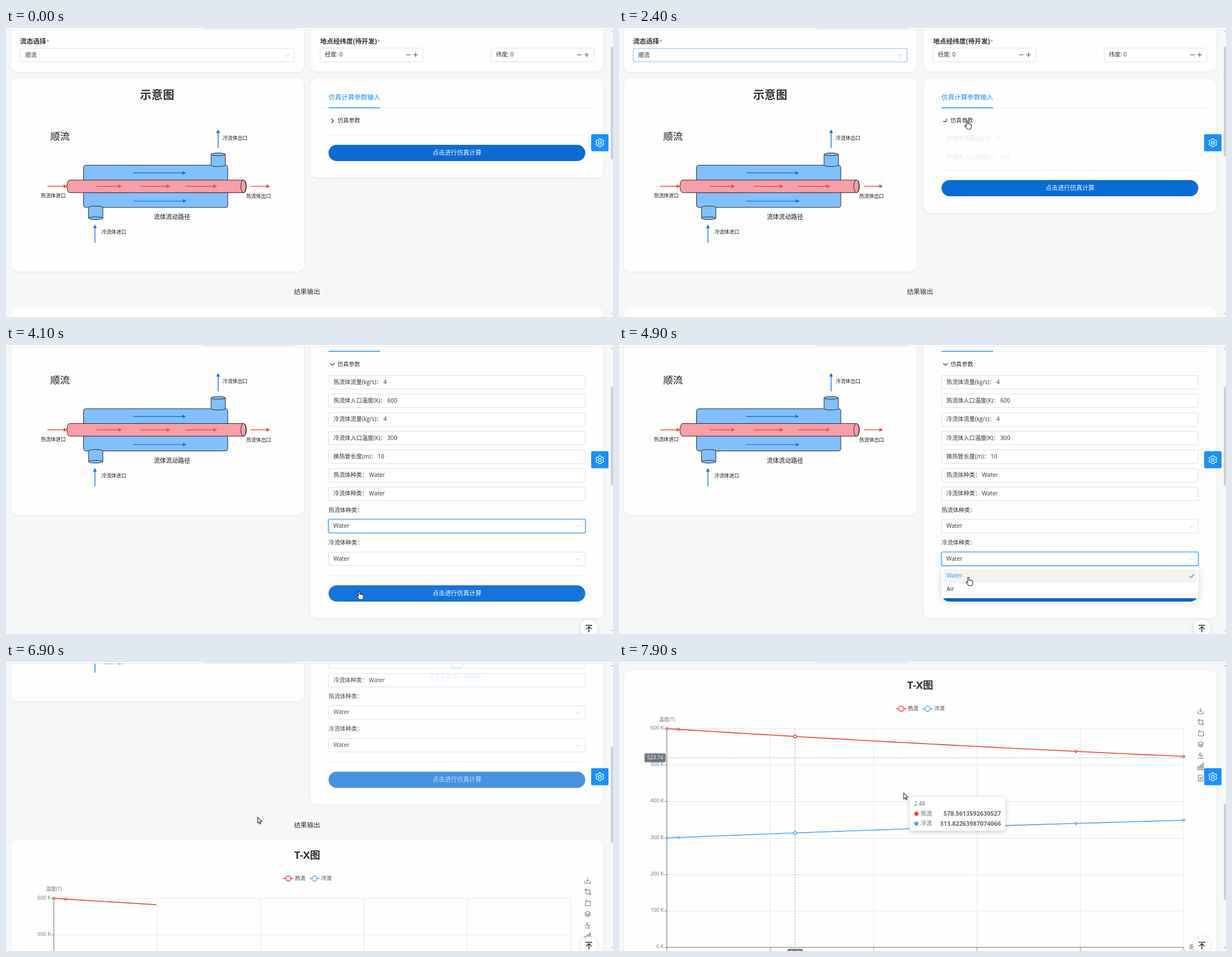
Recreate the animation shown at these times as an HTML page with a canvas. Size 1084 px wide and 517 px high, loop 8000 ms.

```html
<!DOCTYPE html>
<html lang="zh-CN">
<head>
<meta charset="utf-8">
<title>换热器仿真</title>
<style>
html, body { margin: 0; width: 100%; height: 100%; overflow: hidden; background: #f6f8f8; }
canvas { display: block; width: 1084px; height: 517px; }
</style>
</head>
<body>
<canvas id="stage"></canvas>
<script>
const W = 1084, H = 517, LOOP = 8000, STEP = 100;
const FONT = '"Open Sans", "Noto Sans CJK SC", "Noto Sans CJK", sans-serif';
const BLUE = '#1890ff', INK = '#303133', LINE = '#dcdfe6', GREY = '#6e7079';
const canvas = document.getElementById('stage');
const dpr = window.devicePixelRatio || 1;
canvas.width = W * dpr;
canvas.height = H * dpr;
const c = canvas.getContext('2d');

// Timing helpers
const clamp = v => Math.max(0, Math.min(1, v));
const ramp = (t, start, dur) => { const k = clamp((t - start) / dur); return k * k * (3 - 2 * k); };
const fade = (t, on, off, dur = 200) => ramp(t, on, dur) - ramp(t, off, dur);
const within = (t, a, b) => t >= a && t < b;

// Drawing helpers
function text(s, x, y, size, color = INK, align = 'left', weight = 400) {
  c.font = `${weight} ${size}px ${FONT}`;
  c.textAlign = align;
  c.textBaseline = 'middle';
  c.fillStyle = color;
  c.fillText(s, x, y + 0.5);
  return c.measureText(s).width;
}
function paint(fill, stroke, lw = 1, path) {
  if (fill) { c.fillStyle = fill; path ? c.fill(path) : c.fill(); }
  if (stroke) { c.strokeStyle = stroke; c.lineWidth = lw; path ? c.stroke(path) : c.stroke(); }
}
function rect(x, y, w, h, r, fill, stroke, lw) {
  c.beginPath();
  c.roundRect(x, y, w, h, r);
  paint(fill, stroke, lw);
}
function oval(x, y, rx, ry, fill, stroke, lw) {
  c.beginPath();
  c.ellipse(x, y, rx, ry, 0, 0, 7);
  paint(fill, stroke, lw);
}
const circle = (x, y, r, ...style) => oval(x, y, r, r, ...style);
function line(color, lw, x1, y1, x2, y2) {
  c.beginPath();
  c.moveTo(x1, y1);
  c.lineTo(x2, y2);
  paint(null, color, lw);
}
function place(x, y, turn, draw) {
  c.save();
  c.translate(x, y);
  c.rotate(turn);
  draw();
  c.restore();
}
const icon = (d, x, y, color, lw = 1, fill = null, turn = 0) =>
  place(x, y, turn, () => paint(fill, color, lw, new Path2D(d)));
function layer(alpha, draw) {
  if (alpha <= 0) return;
  c.save();
  c.globalAlpha *= alpha;
  draw();
  c.restore();
}
function shadowed(blur, dy, alpha, draw) {
  c.save();
  c.shadowBlur = blur * dpr;
  c.shadowOffsetY = dy * dpr;
  c.shadowColor = `rgba(0,15,30,${alpha})`;
  draw();
  c.restore();
}
const card = (x, y, w, h) => shadowed(4, 1, 0.07, () => rect(x, y, w, h, 12, '#fefefe'));

// Heat exchanger
function arrow(x, y, len, color, turn = 0) {
  place(x, y, turn, () => {
    line(color, 1.4, 0, 0, len - 2, 0);
    icon('M.5 0L-6-3.4V3.4Z', len, 0, null, 1, color);
  });
}
function nozzle(x, y, turn) {
  place(x, y, turn, () => {
    icon('M-12.8 0V19.5A12.8 2.3 0 0 0 12.8 19.5V0', 0, 0, '#222', 1, '#80c0ff');
    oval(0, 0, 12.8, 2.4, '#80c0ff', '#222');
  });
}
function diagram() {
  const red = '#f04a3e', blue = '#1570ee', ink = '#151515', up = -Math.PI / 2;
  text('示意图', 270, 121.5, 20.3, INK, 'center', 700);
  text('顺流', 79, 195, 17.4, ink);
  rect(138.5, 245.5, 257.5, 75.5, 4, '#80c0ff', '#222');
  icon('M0 0H311A4.8 11.3 0 0 1 311 22.6H0A4.6 11.3 0 0 1 0 0Z', 113.5, 272, '#222', 1, '#fa9ea8');
  oval(424, 283.3, 4.6, 11.3, '#fa9ea8', '#222');
  nozzle(379, 226, 0);
  nozzle(160.2, 340.3, Math.PI);
  for (const [x, len] of [[74, 35], [162, 44.5], [240, 53], [320, 56.5], [437, 34]]) arrow(x, 283.2, len, red);
  arrow(227, 259.3, 94, blue);
  arrow(227, 309.6, 95, blue);
  arrow(378.8, 214.5, 32.5, blue, up);
  arrow(158.8, 384.5, 32.5, blue, up);
  text('冷流体出口', 387, 197, 8.8, ink);
  text('热流体进口', 62.5, 300.5, 8.8, ink);
  text('热流体出口', 429, 301.5, 8.8, ink);
  text('冷流体进口', 170.5, 365.5, 8.8, ink);
  text('流体流动路径', 264, 339, 10.8, ink);
}

// Form controls
function select(x, y, w, label, focus, glow) {
  if (focus && glow) rect(x - 0.5, y - 0.5, w + 1, 25, 3, null, 'rgba(24,144,255,.25)', 3);
  rect(x, y, w, 24, 2, '#fff', LINE);
  layer(+focus, () => rect(x, y, w, 24, 2, null, glow ? '#3a9ff8' : '#7abdf7', 1.2));
  text(label, x + 8.7, y + 12, 10.2);
  icon('M-3.5-2L0 2 3.5-2', x + w - 12.5, y + 12.5, '#c0c4cc');
}
function options(x, y, w, items, alpha) {
  layer(alpha, () => {
    shadowed(15, 4, 0.17, () => rect(x, y, w, 56, 2, '#fff'));
    rect(x + 3, y + 4, w - 6, 24, 2, '#f3f3f4');
    items.forEach((s, i) => text(s, x + 9, y + 15.6 + 24 * i, 10.2, i ? '#1f2d3d' : '#2a8de8'));
    icon('M-4 0L-.5 3 4.5-3', x + w - 12, y + 16, BLUE, 1.3);
  });
}
function stepper(x, label, minus) {
  rect(x, 36, 183.5, 24.5, 2, '#fff', LINE);
  text(label, x + 8.5, 48, 10.2);
  icon('M-4 0H4M9 0H17M13-4V4', minus, 48, '#444');
}

const ROWS = [
  ['热流体流量(kg/s)：', 4], ['热流体入口温度(K)：', 600],
  ['冷流体流量(kg/s)：', 4], ['冷流体入口温度(K)：', 300],
  ['换热管长度(m)：', 10], ['热流体种类：', 'Water'], ['冷流体种类：', 'Water']
];

function form(t, grow, hover) {
  text('仿真计算参数输入', 576, 124.6, 11.55, BLUE);
  line('#f0f0f0', 1, 562, 143.5, 1050, 143.5);
  rect(576, 142, 92, 1.6, 0, '#2491f7');
  icon('M-2-4L2 0-2 4', 583, 166, '#333', 1.1, null, ramp(t, 2300, 200) * Math.PI / 2);
  text('仿真参数', 592, 166.2, 10.15);

  c.save();
  c.beginPath();
  c.rect(570, 180, 480, Math.max(0, grow - 2));
  c.clip();
  layer(ramp(t, 2360, 200), () => {
    ROWS.forEach(([label, value], i) => {
      const y = 198 + i * 33.3;
      rect(576, y - 12, 458.5, 24, 2, '#fff', LINE);
      const w = text(label, 584.7, y, 10.2);
      text(value, 587.2 + w, y, 10.2);
    });
    ['热', '冷'].forEach((kind, i) => {
      const y = 443.5 + i * 58.5, from = 3800 + i * 800;
      text(kind + '流体种类：', 576, y - 16.5, 10.2);
      select(576, y, 458.5, 'Water', within(t, from, i ? 6200 : 4600), true);
    });
  });
  c.restore();

  line('#ebeef2', 1, 576, 191.5 + grow, 1034, 191.5 + grow);
  layer(1 - 0.25 * fade(t, 6100, 6760, 400), () => {
    rect(576, 209 + grow, 458.5, 29, 14.5, hover ? '#1275dd' : '#086bd6');
    text('点击进行仿真计算', 805.5, 223.6 + grow, 10.9, '#fff', 'center');
  });
}
function loading(t, alpha) {
  layer(alpha * 0.7, () => {
    c.beginPath();
    c.arc(805, 363, 13, t / 160, t / 160 + 4.5);
    paint(null, BLUE, 2);
    text('正在计算中，请稍等...', 805.5, 392, 10.2, BLUE, 'center');
  });
}

// Chart
const X0 = 85.5, XW = 923, Y0 = 1179.2, YH = 391.2;
const px = x => X0 + x / 10 * XW, py = v => Y0 - v / 600 * YH;
const SERIES = [
  { name: '热流', color: '#fa3534', value: '578.5613592630527', f: x => 600 - 258.2 * (1 - Math.exp(-0.035 * x)) },
  { name: '冷流', color: '#48a6fa', value: '313.82263987074066', f: x => 300 + 153.7 * (1 - Math.exp(-0.038 * x)) }
];
const MARK = 2.48, SAMPLES = [0, 0.225, MARK, 7.914, 10];
const TOOLS = [
  'M-5 1V5H5V1M0-5V2M-3-1L0 2 3-1',
  'M-3-6V4H6M-6-3H4V6',
  'M-4-3H5V5H-4V0M-1-6L-4-3-1 0',
  'M-5-2L0-5 5-2 0 1ZM-5 0L0 3 5 0M-5 2L0 5 5 2',
  'M-5 1H-3L-1-5 1 3 2 0H5M-5 5H5',
  'M-5 4V0H-3V4M-1 4V-3H1V4M3 4V-6H5V4M-6 5.5H6',
  'M-4-5H2L4-3V6H-4ZM-2-1H2M-2 1H2M-2 3H2'
];

function badge(s, x, y, w, h) {
  rect(x - w / 2, y - h / 2, w, h, 2, '#6c7884');
  text(s, x, y - 0.3, 9, '#fff', 'center');
}
function pointer() {
  c.setLineDash([3, 2]);
  line('#b0b3b8', 1, px(MARK), py(600), px(MARK), Y0);
  line('#b0b3b8', 1, X0, 840.3, X0 + XW, 840.3);
  c.setLineDash([]);
  badge('523.74', 64.5, 840.2, 38, 15.8);
  badge(MARK, 314.5, 1189.5, 27, 15);
}
function axes() {
  for (let i = 0; i <= 6; i++) {
    const y = Math.round(py(i * 100)) + 0.3;
    line('#e2e7f1', 1, X0, y, X0 + XW, y);
    line(GREY, 1, X0 - 4, y, X0, y);
    text(i * 100 + ' K', 80, y - 1, 9.2, GREY, 'right');
  }
  for (let x = 0; x <= 10; x += 2) {
    line('#e2e7f1', 1, px(x), py(600), px(x), Y0);
    line(GREY, 1, px(x), Y0, px(x), Y0 + 4);
    text(x, px(x), Y0 + 10, 9.2, GREY, 'center');
  }
  line(GREY, 1, X0, py(600), X0, Y0);
  line(GREY, 1, X0, Y0, X0 + XW, Y0);
}
function chart(t, tip) {
  text('T-X图', 538, 712, 18.4, INK, 'center', 700);
  SERIES.forEach(({ name, color }, i) => {
    const x = 504 + i * 47;
    line(color, 1.6, x - 9, 752.5, x + 9, 752.5);
    circle(x, 752.5, 4.6, '#fff', color, 1.5);
    text(name, x + 12, 752, 9.3, '#333');
  });
  text('温度(T)', X0, 771.5, 9, GREY, 'center');
  text('距离(m)', 1018, Y0 - 0.7, 9, GREY);
  TOOLS.forEach((d, i) => icon(d, 1038.7, 756 + i * 20, '#6b6b6b'));
  if (t < 6800) return;

  axes();
  if (tip) pointer();
  const shown = 10 * clamp((t - 6800) / 505);
  for (const { color, f } of SERIES) {
    c.beginPath();
    for (let k = 0; k <= 60; k++) c.lineTo(px(shown * k / 60), py(f(shown * k / 60)));
    paint(null, color, 1.6);
    for (const x of SAMPLES)
      if (x <= shown) circle(px(x), py(f(x)), tip && x === MARK ? 2.5 : 1.8, '#fff', color, 1.4);
  }
}
function tooltip(x, y) {
  shadowed(8, 2, 0.22, () => rect(x, y, 171, 60, 3, '#fff'));
  text(MARK, x + 8, y + 12.5, 10.2, '#666');
  SERIES.forEach(({ name, color, value }, i) => {
    const ry = y + 30 + i * 17.5;
    circle(x + 12, ry - 0.3, 3.7, color);
    text(name, x + 19.5, ry, 10.3, '#666');
    text(value, x + 163, ry, 10.9, '#666', 'right', 700);
  });
}

// Page
const menus = t => ({ flow: fade(t, 800, 1300), hot: fade(t, 3750, 3900), cold: fade(t, 4600, 5000) });

function page(t, grow, hover, tip) {
  card(9, -30, 523, 108.5);
  card(544, -30, 522.5, 107.5);
  const heading = (s, x) => text('*', x + text(s, x, 24.2, 11.7, INK, 'left', 700), 24.2, 11, '#f56c5c');
  heading('流态选择', 25);
  heading('地点经纬度(待开发)', 561);
  select(25.5, 36.5, 489, '顺流', fade(t, 650, 2350), false);
  stepper(561, '经度: 0', 718.5);
  stepper(866.5, '纬度: 0', 1024);

  card(9, 90, 523, 345.5);
  diagram();
  card(544, 91, 522.5, 176.5 + grow);
  const busy = fade(t, 6100, 6760);
  layer(1 - busy / 2, () => form(t, grow, hover));
  loading(t, busy);

  const y = Math.max(435, 267 + grow) + 37.5;
  line('#eceff0', 1, 9, y, 504, y);
  line('#eceff0', 1, 571, y, 1066, y);
  text('结果输出', 537.5, y + 0.3, 11.7, INK, 'center');
  card(9, y + 26.5, 1057.5, 620);
  if (grow > 340) chart(t, tip);

  const open = menus(t), kinds = ['Water', 'Air'];
  options(25.5, 63.5, 489, ['顺流', '逆流'], open.flow);
  options(576, 470, 458.5, kinds, open.hot);
  options(576, 528.5, 458.5, kinds, open.cold);
}

function overlay(t, s, grow) {
  rect(0, 0, W, 2, 0, '#fff');
  rect(352, 0, 164, 2, 0, '#e3f1fe');
  rect(0, 2, W, 1, 0, '#e6eaec');
  rect(1079, 3, 5, H, 0, '#f8f9f9');
  const k = grow / 352.5, done = t >= 6800;
  rect(1080, 34 - 4 * k + s * (done ? 0.335 : 0.343), 4, done ? 171 : 201 - 25 * k, 0, '#cdcfd0');
  icon('M-1.5 1.5L0 0 1.5 1.5', 1082, 6, '#888');
  icon('M-1.5-1.5L0 0 1.5-1.5', 1082, 511.5, '#888');

  rect(1045, 190, 31, 30.5, 2, BLUE);
  c.beginPath();
  for (let a = 0; a < 6.28; a += 0.1) {
    const r = 6.5 + 0.9 * Math.cos(6 * a);
    c.lineTo(1060.5 + r * Math.sin(a), 205.3 - r * Math.cos(a));
  }
  c.closePath();
  paint(null, '#fff', 1.3);
  circle(1060.5, 205.3, 2.5, null, '#fff', 1.3);

  layer(clamp(s / 90), () => {
    shadowed(6, 1, 0.16, () => circle(1041, 506.7, 15.5, '#fff'));
    icon('M-6-5.5H6M0 7V-3M-4.7 1.5L0-3.2 4.7 1.5', 1041, 507, '#222c38', 1.5);
  });
}

// Each wheel notch scrolls by the same distance.
const NOTCHES = [3400, 5400, 6700, 7200, 7500, 7848];
const scroll = t => 131.5 * NOTCHES.reduce((sum, start) => sum + ramp(t, start, 288), 0);

// Mouse moves: start, duration, destination.
const MOVES = [
  [100, 400, 362, 46], [900, 300, 350, 78], [1700, 600, 621.5, 166], [2400, 500, 648, 400],
  [3500, 300, 626, 326], [3900, 200, 630.5, 440.5], [4300, 300, 622, 380], [4600, 300, 624, 415.5],
  [5300, 600, 652.5, 327], [6200, 500, 449.5, 277.5], [7500, 400, 508.5, 234.3]
];
function mouse(t) {
  let x = 1042, y = 356;
  for (const [start, dur, tx, ty] of MOVES) {
    const k = ramp(t, start, dur);
    x += (tx - x) * k;
    y += (ty - y) * k;
  }
  return [x, y];
}
const HAND = 'M-1.2 8V1Q0-.8 1.2 1V5.2Q2.6 4.4 3.6 5.8 5 5 6 6.4 8 6.2 8 8L7.6 11.5 6.4 15H.4L-4 9Q-3.6 7-1.2 9Z';
const ARROW = 'M0 0V10.8L2.4 8.6 4 12.2 5.6 11.5 4 8 7.4 7.6Z';

function draw(t) {
  const s = scroll(t), grow = 352.5 * ramp(t, 2365, 130);
  const [x, y] = mouse(t);
  const over = (left, top, w, h) => within(x, left, left + w) && within(y + s, top, top + h);
  const hover = over(576, 208 + grow, 458, 31);
  const hand = hover || over(25, 36, 489, 25) || over(576, 155, 60, 22) ||
    grow > 0 && (over(576, 443, 458, 25) || over(576, 502, 458, 25)) ||
    Object.values(menus(t)).some(a => a > 0);
  const tip = t >= 7500;

  c.setTransform(dpr, 0, 0, dpr, 0, 0);
  rect(0, 0, W, H, 0, '#f6f8f8');
  place(0, -s, 0, () => page(t, grow, hover, tip));
  overlay(t, s, grow);
  if (tip) tooltip(x + 10.5, y + 7.5);
  if (t >= 100) icon(hand ? HAND : ARROW, x, y, '#222b3a', 1.1, '#fff');
}

const start = performance.now();
function tick() {
  const t = (performance.now() - start) % LOOP;
  draw(Math.floor(t / STEP) * STEP);
  requestAnimationFrame(tick);
}
tick();
</script>
</body>
</html>
```
